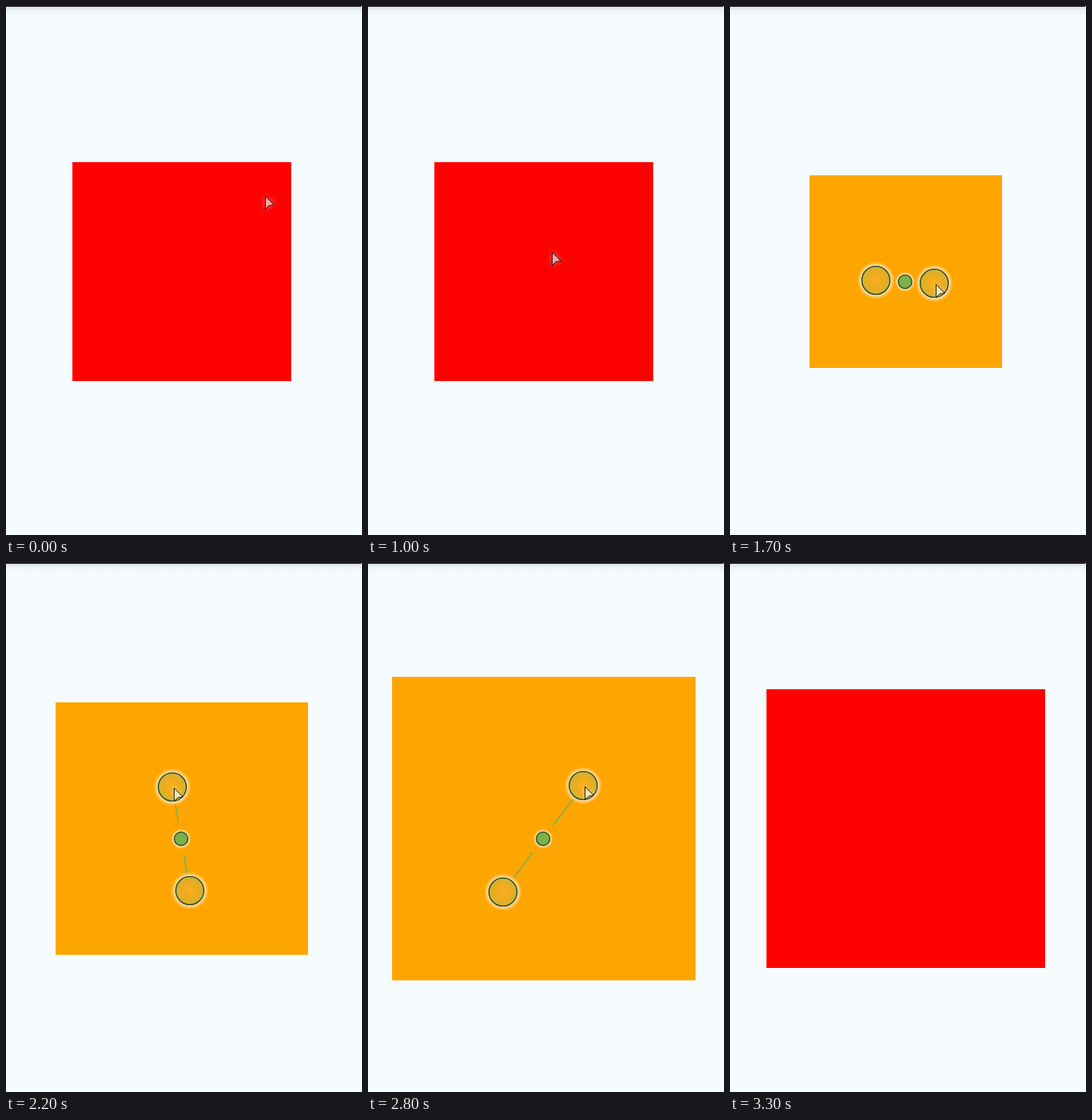
These frames come from a looping animation (488 px wide and 725 px high, 3800 ms). An HTML page with a canvas:

```html
<!DOCTYPE html>
<html lang="en">
<head>
<meta charset="utf-8">
<title>Pinch to scale</title>
<style>
  html, body { margin: 0; width: 100%; height: 100%; overflow: hidden; background: #f5fbfe; }
  canvas { display: block; }
</style>
</head>
<body>
<canvas id="stage" width="488" height="725"></canvas>
<script>
const W = 488, H = 725, LOOP = 3800, STEP = 100;
const ctx = document.getElementById('stage').getContext('2d');
const hub = { x: 240, y: 378 };
const box = { x: 241, y: 364 };
const DARK = '#2f5030';

// The finger swings around the hub: angle in degrees, reach from the hub, square size.
const swing = [
  { t: 700, angle: 123, reach: 62, size: 300 },
  { t: 800, angle: 76, reach: 43, size: 300 },
  { t: 1000, angle: 76, reach: 43, size: 300 },
  { t: 1400, angle: 55, reach: 54, size: 300 },
  { t: 1700, angle: -3, reach: 40, size: 264 },
  { t: 1900, angle: -3, reach: 40, size: 264 },
  { t: 2200, angle: 99.6, reach: 72, size: 346 },
  { t: 2500, angle: 72.6, reach: 103.7, size: 446 },
  { t: 3000, angle: 30.8, reach: 78, size: 382 }
];

const within = (t, from, to) => t >= from && t < to;
const mix = (a, b, u) => a + (b - a) * u;
const bezier = (a, b, c, u) => mix(mix(a, b, u), mix(b, c, u), u);

function hoverAt(t) {
  const u = Math.min(t / 600, 1);
  return { x: bezier(353, 75, 206, u), y: bezier(259, 440, 326, u), size: 300 };
}

function swingAt(t) {
  const b = swing.find(k => t <= k.t) || swing[swing.length - 1];
  const a = swing[Math.max(swing.indexOf(b) - 1, 0)];
  const u = Math.min(1, (t - a.t) / (b.t - a.t) || 0) ** 1.5;
  const angle = mix(a.angle, b.angle, u) * Math.PI / 180;
  const reach = mix(a.reach, b.reach, u);
  return {
    x: Math.round(hub.x + reach * Math.cos(angle)),
    y: Math.round(hub.y - reach * Math.sin(angle)),
    size: 2 * Math.round(mix(a.size, b.size, u) / 2)
  };
}

function radial(x, y, r0, r1, ...stops) {
  const g = ctx.createRadialGradient(x, y, r0, x, y, r1);
  stops.forEach((c, i) => g.addColorStop(i / (stops.length - 1), c));
  return g;
}

function disc(x, y, r, fill) {
  ctx.beginPath();
  ctx.arc(x, y, r, 0, 2 * Math.PI);
  ctx.fillStyle = fill;
  ctx.fill();
}

function outline(x, y, r, color, width) {
  ctx.beginPath();
  ctx.arc(x, y, r, 0, 2 * Math.PI);
  ctx.strokeStyle = color;
  ctx.lineWidth = width;
  ctx.stroke();
}

function halo(x, y, r, spread) {
  ctx.beginPath();
  ctx.arc(x, y, r + spread, 0, 2 * Math.PI);
  ctx.arc(x, y, r, 0, 2 * Math.PI, true);
  ctx.fillStyle = radial(x, y, r, r + spread,
    'rgba(255,255,255,.7)', 'rgba(255,255,255,.3)', 'rgba(255,255,255,0)');
  ctx.fill();
}

function background() {
  ctx.fillStyle = '#f5fbfe';
  ctx.fillRect(0, 0, W, H);
  const shade = ctx.createLinearGradient(0, 1, 0, 14);
  shade.addColorStop(0, 'rgba(60,70,80,.16)');
  shade.addColorStop(.3, 'rgba(60,70,80,.05)');
  shade.addColorStop(1, 'rgba(60,70,80,0)');
  ctx.fillStyle = shade;
  ctx.fillRect(0, 1, W, 13);
  ctx.fillStyle = '#000';
  ctx.fillRect(0, 0, W - 1, 1);
}

function finger(x, y) {
  halo(x, y, 20, 6);
  disc(x, y, 19.5, radial(x, y, 0, 19.5,
    'rgba(255,190,90,.4)', 'rgba(190,190,100,.25)', 'rgba(130,200,140,.4)'));
  outline(x, y, 19.2, DARK, 1.6);
}

function link(dx, dy) {
  const d = Math.hypot(dx, dy), gap = 23.5;
  if (d <= 2 * gap) return;
  const ux = dx / d, uy = dy / d;
  ctx.strokeStyle = '#48b870';
  ctx.lineWidth = 1.2;
  ctx.beginPath();
  for (const s of [1, -1]) {
    ctx.moveTo(hub.x + s * ux * gap, hub.y + s * uy * gap);
    ctx.lineTo(hub.x + s * ux * (d - gap), hub.y + s * uy * (d - gap));
  }
  ctx.stroke();
}

function pinch({ x, y }) {
  const dx = x - hub.x, dy = y - hub.y;
  link(dx, dy);
  ctx.setLineDash([4, 3]);
  outline(hub.x, hub.y, 21, 'rgba(170,165,60,.35)', 1);
  ctx.setLineDash([]);
  halo(hub.x, hub.y, 10, 4);
  disc(hub.x, hub.y, 9.5, '#7cb04a');
  outline(hub.x, hub.y, 9.2, DARK, 1.6);
  finger(hub.x - dx, hub.y - dy);
  finger(x, y);
}

function pointer(x, y) {
  ctx.save();
  ctx.translate(Math.round(x) + .5, Math.round(y) + .5);
  ctx.beginPath();
  ctx.moveTo(0, 0);
  ctx.lineTo(12, 12);
  ctx.lineTo(5, 13);
  ctx.lineTo(0, 18);
  ctx.closePath();
  ctx.shadowColor = '#fff';
  ctx.shadowBlur = 7;
  ctx.fillStyle = 'rgba(255,255,255,.5)';
  ctx.fill();
  ctx.shadowColor = 'transparent';
  ctx.strokeStyle = '#111';
  ctx.lineWidth = 1;
  ctx.stroke();
  ctx.restore();
}

function draw(now) {
  const t = Math.floor((now % LOOP) / STEP) * STEP;
  const pose = t < 700 ? hoverAt(t) : swingAt(t);
  background();
  ctx.fillStyle = within(t, 1300, 3200) ? '#ffa500' : '#f00';
  ctx.fillRect(box.x - pose.size / 2, box.y - pose.size / 2, pose.size, pose.size);
  if (within(t, 700, 1000) || within(t, 1200, 3300)) pinch(pose);
  if (t < 3300) pointer(pose.x + 2, pose.y + 1);
}

const start = performance.now();
function tick() {
  draw(performance.now() - start);
  requestAnimationFrame(tick);
}
tick();
</script>
</body>
</html>
```
